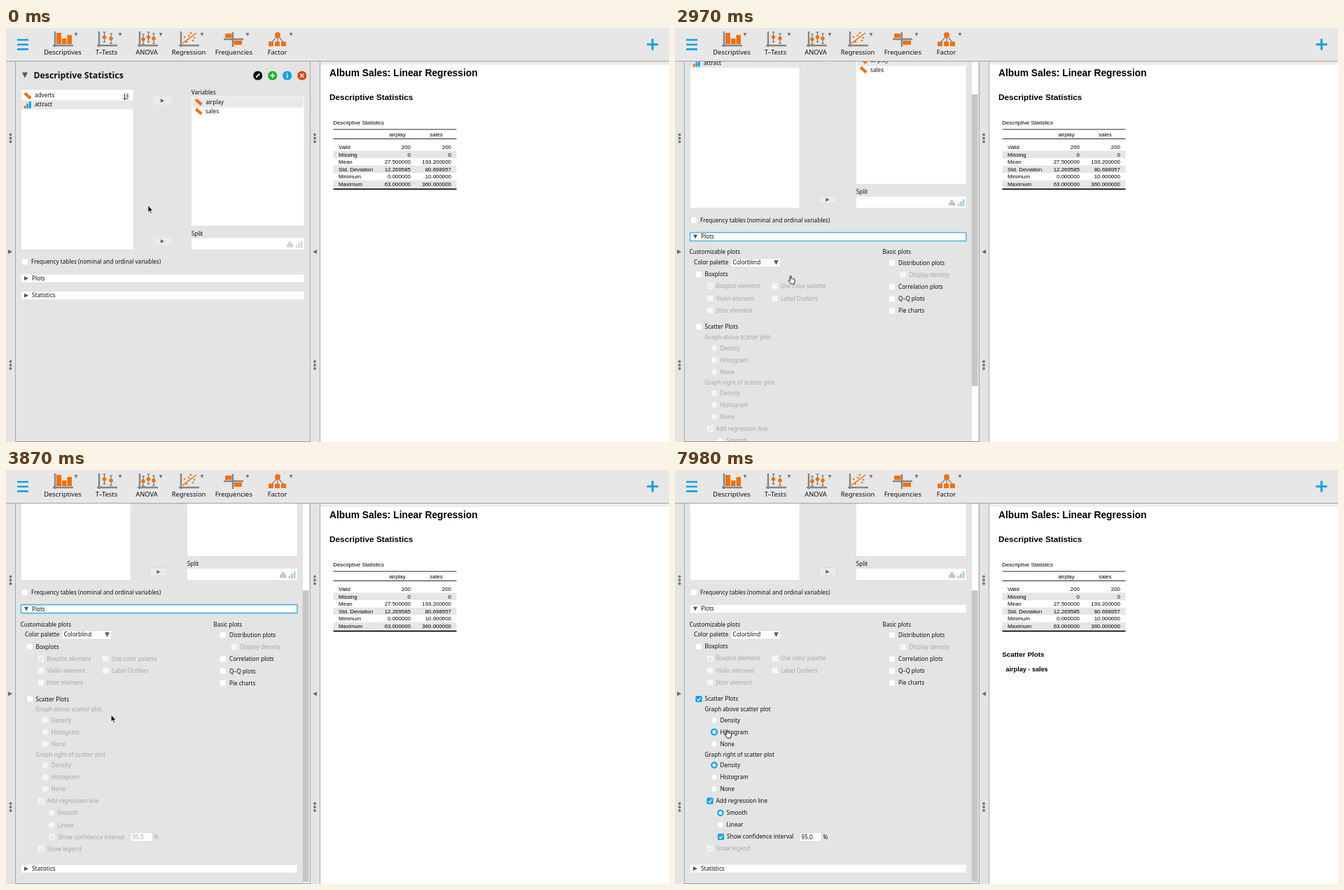
These frames come from a looping animation (947 px wide and 592 px high, 8 s). An HTML page:

```html
<!DOCTYPE html>
<html lang="en">
<head>
<meta charset="utf-8">
<title>Descriptive Statistics</title>
<style>
html, body { margin: 0; width: 100%; height: 100%; overflow: hidden; background: #fff; }
svg { display: block; width: 100vw; height: 100vh; }
text { font: 8.15px "Noto Sans", "Open Sans", sans-serif; fill: #111; white-space: pre; }
.off { fill: #a6a6a6; }
.tool { font-size: 9.4px; text-anchor: middle; }
.head { font-size: 12.25px; font-weight: 700; }
.doc text { font: 7.9px "Liberation Sans", Arial, sans-serif; fill: #000; }
.doc .h1 { font-size: 13.8px; font-weight: 700; }
.doc .h2 { font-size: 11.8px; font-weight: 700; }
.doc .h3 { font-size: 9.9px; font-weight: 700; }
.doc .h4 { font-size: 9.1px; font-weight: 700; }
.doc .axis { font-size: 11px; }
.doc .name { font-size: 11.5px; }
.mid { text-anchor: middle; }
.end { text-anchor: end; }
</style>
</head>
<body>
<svg viewBox="0 0 947 592" preserveAspectRatio="none">
  <clipPath id="view"><rect x="14" y="48" width="420" height="543"/></clipPath>
  <clipPath id="fold"><rect id="foldBox" x="14" y="366" width="410" height="0"/></clipPath>
  <g id="frame"></g>
  <g clip-path="url(#view)"><g id="panel"></g><g id="bar"></g></g>
  <g id="doc" class="doc"></g>
  <g id="plot" class="doc"></g>
  <g id="spin" fill="none" stroke-width="1.4">
    <circle r="4.3" stroke="#ddd"/><path d="M0-4.3A4.3 4.3 0 1 1-4.3 0" stroke="#555"/>
  </g>
  <path id="pointer"/>
</svg>
<script>
const BLUE = '#14a1e3', ORANGE = '#f2700d', GREY = '#858585';
const $ = id => document.getElementById(id);

const text = (x, y, s, cls = '') => `<text x="${x}" y="${y}" class="${cls}">${s}</text>`;
const rect = (x, y, w, h, fill, more = '') =>
  `<rect x="${x}" y="${y}" width="${w}" height="${h}" fill="${fill}" ${more}/>`;
const dot = (x, y, r, fill, more = '') => `<circle cx="${x}" cy="${y}" r="${r}" fill="${fill}" ${more}/>`;
const line = (d, stroke, w = 1) => `<path d="${d}" fill="none" stroke="${stroke}" stroke-width="${w}"/>`;
const shape = (d, fill, more = '') => `<path d="${d}" fill="${fill}" ${more}/>`;
const right = (x, y, r, fill = '#555') => shape(`M${x - r} ${y - r}L${x + r} ${y}L${x - r} ${y + r}Z`, fill);
const down = (x, y, r, fill = '#555') => shape(`M${x - r} ${y - r}H${x + r}L${x} ${y + r}Z`, fill);

// Smooth curve through points, without the leading command
function curve(p) {
  let d = p[0].join();
  for (let i = 0; i < p.length - 1; i++) {
    const a = p[i - 1] || p[i], b = p[i], c = p[i + 1], e = p[i + 2] || c;
    d += `C${b[0] + (c[0] - a[0]) / 6},${b[1] + (c[1] - a[1]) / 6} ` +
         `${c[0] - (e[0] - b[0]) / 6},${c[1] - (e[1] - b[1]) / 6} ${c}`;
  }
  return d;
}

function frameMarkup() {
  let m = rect(0, 0, 947, 592, '#e4e4e4') + rect(449, 49, 498, 543, '#fff') +
    rect(449, 48, 498, 4.5, '#ececec') + rect(0, 0, 947, 47, '#e7e7e7') +
    line('M0 47.5H947', '#a2a2a2') +
    line('M13.5 48V592M434.5 48V592M448.5 48V592', '#a8a8a8') + line('M14 591.5H434', '#999') +
    line('M16 17H32M16 23.7H32M16 30.4H32', BLUE, 2.6) + line('M915.5 23.5H931.5M923.5 15.5V31.5', BLUE, 3.2);
  for (const x of [6.5, 441])
    for (const y of [152.5, 157.5, 162.5, 477, 482, 487]) m += dot(x, y, 2, '#7a7a7a');
  m += right(6, 320, 3, '#666') + shape('M444 317L438.5 320L444 323Z', '#666');

  const axes = x => line(`M${x + 2} 5V27M${x - 1} 25H${x + 28}`, GREY, 2.4);
  const stem = (x, y) => line(`M${x} ${y - 7}V${y + 7}M${x - 2} ${y - 7}h4M${x - 2} ${y + 7}h4`, '#666') + dot(x, y, 2.8, ORANGE);
  m += axes(68) + rect(72, 7, 7, 16, ORANGE) + rect(80, 15, 6.5, 8, ORANGE) + rect(87.5, 10, 6.5, 13, ORANGE);
  m += axes(131) + stem(140.5, 13) + stem(150, 15);
  m += axes(189) + stem(196, 16) + stem(203.5, 13) + stem(211, 15);
  m += axes(248) + line('M252 22L272 7', ORANGE, 1.5);
  for (const [x, y] of [[255, 13], [261, 11], [267, 18], [264, 7], [269, 14], [258, 20]]) m += dot(x, y, 1.3, ORANGE);
  m += line('M324 6V27M311 16H339', GREY, 2.4) + rect(313, 8, 9.5, 6, ORANGE) + rect(325.5, 18, 11.5, 6, ORANGE);
  m += line('M388 10V21M388 11L379 21M388 11L397 21', GREY, 1.4) + dot(388, 10, 4, ORANGE);
  for (const x of [375, 384, 393]) m += rect(x, 19.5, 7, 6.5, ORANGE);
  [['Descriptives', 81, 100], ['T–Tests', 143.5, 163], ['ANOVA', 201, 221], ['Regression', 261, 280],
   ['Frequencies', 325.3, 345], ['Factor', 387.5, 407]].forEach(([s, x, a]) =>
    m += text(x, 38.3, s, 'tool') + down(a, 9.5, 2.4, '#777'));
  return m;
}

const ruler = (x, y) => rect(-5.5, -2.1, 11, 4.2, ORANGE, `transform="translate(${x} ${y}) rotate(42)"`);
const bars = (x, y, a = ORANGE, b = BLUE) =>
  rect(x - 5, y + 1, 2.6, 4, a) + rect(x - 1.6, y - 2, 2.8, 7, b) + rect(x + 2, y - 5, 2.8, 10, b);

// kind: c = checkbox, r = radio; mode: 0 disabled, 1 enabled, 2 selected
function option(kind, x, y, tx, label, mode, { tick, focus } = {}) {
  const fill = mode ? '#fff' : '#f6f6f6', edge = `stroke="${mode ? '#d6d6d6' : '#e4e4e4'}" stroke-width=".6"`;
  const check = c => line(`M${x - 2.3} ${y + .2}l1.7 2 3-4.2`, c, 1.2);
  let m = '';
  if (kind === 'c') {
    if (focus) m += rect(x - 5.8, y - 5.8, 11.6, 11.6, '#8fd0f0', 'rx="2"');
    m += rect(x - 4.6, y - 4.6, 9.2, 9.2, mode === 2 ? BLUE : fill, 'rx="1.6" ' + (mode === 2 ? '' : edge));
    if (mode === 2) m += check('#fff');
    else if (tick) m += check('#d8d8d8');
  } else {
    if (focus) m += dot(x, y, 5.6, '#8fd0f0');
    m += mode === 2 ? dot(x, y, 3.7, '#fff', `stroke="${BLUE}" stroke-width="2.2"`) : dot(x, y, 4.5, fill, edge);
  }
  return m + text(tx, y + 2.9, label, mode ? '' : 'off');
}

function section(y, label, open, focus, w) {
  return rect(21.5, y - 6, w, 12, '#fff', focus ? 'stroke="#4fb3e8" stroke-width="1.6" rx="1"' : 'stroke="#d8d8d8" stroke-width=".5" rx="1"') +
    (open ? down : right)(29, y, 3) + text(37, y + 2.9, label);
}

function plotOptions(on, hist) {
  const live = on ? 1 : 0, pick = on ? 2 : 0, cls = on ? '' : 'off';
  return text(20.5, 383, 'Customizable plots') + text(296.5, 383, 'Basic plots') +
    text(27, 397.7, 'Color palette') + rect(80, 389, 70.5, 12.4, '#fff', 'rx="1" stroke="#d0d0d0" stroke-width=".6"') +
    text(82.5, 397.7, 'Colorblind') + down(144.5, 395, 3.3) +
    option('c', 34, 412, 42.5, 'Boxplots', 1) +
    option('c', 50, 429, 58.5, 'Boxplot element', 0, { tick: 1 }) +
    option('c', 142.5, 429, 151, 'Use color palette', 0) +
    option('c', 50, 446.3, 58.5, 'Violin element', 0) +
    option('c', 142.5, 446.3, 151, 'Label Outliers', 0) +
    option('c', 50, 463.4, 58.5, 'Jitter element', 0) +
    option('c', 310, 395.5, 319, 'Distribution plots', 1) +
    option('c', 326, 412.5, 334.5, 'Display density', 0) +
    option('c', 310, 429.8, 319, 'Correlation plots', 1) +
    option('c', 310, 447, 319, 'Q–Q plots', 1) +
    option('c', 310, 464, 319, 'Pie charts', 1) +
    option('c', 34, 487, 42.5, 'Scatter Plots', on ? 2 : 1, { focus: on && !hist }) +
    text(42.5, 504.8, 'Graph above scatter plot', cls) +
    option('r', 56, 517.2, 64.5, 'Density', hist ? 1 : pick) +
    option('r', 56, 534.2, 64.5, 'Histogram', hist ? 2 : live, { focus: hist }) +
    option('r', 56, 551.2, 64.5, 'None', live) +
    text(42.5, 569.2, 'Graph right of scatter plot', cls) +
    option('r', 56, 581.5, 64.5, 'Density', pick) +
    option('r', 56, 598.5, 64.5, 'Histogram', live) +
    option('r', 56, 615.5, 64.5, 'None', live) +
    option('c', 50, 632.7, 58.5, 'Add regression line', pick, { tick: 1 }) +
    option('r', 65, 649.8, 73.5, 'Smooth', pick) +
    option('r', 65, 667, 73.5, 'Linear', live) +
    option('c', 65.5, 684, 74, 'Show confidence interval', pick, { tick: 1 }) +
    rect(178, 677.8, 31, 12.6, '#fff', 'stroke="#d0d0d0" stroke-width=".6"') +
    text(180.5, 687, '95.0', cls) + text(211.5, 687, '%', cls) +
    option('c', 50, 701, 58.5, 'Show legend', 0, { tick: 1 });
}

function panelMarkup(fold, on, hist) {
  const narrow = fold > .5, L = narrow ? 178 : 182, R = narrow ? 258.7 : 264.7, E = narrow ? 416 : 426;
  const mid = narrow ? 218 : 223.5, top = E - 3.3;
  const box = (x, y, w, h) => rect(x, y, w, h, '#fff', 'stroke="#d8d8d8" stroke-width=".5"');
  const arrow = y => rect(mid - 13, y - 6, 26, 12, '#ebebeb', `rx="1.5" stroke="${narrow ? '#d2d2d2' : '#e6e6e6'}" stroke-width=".7"`) +
    right(mid, y, 2.7, '#666');
  let m = down(27, 67.5, 4) + text(39.5, 72.2, 'Descriptive Statistics', 'head');
  ['#111', '#12b526', BLUE, '#d8480f'].forEach((c, i) => m += dot(top - 63 + i * 21, 68, 6.6, c));
  m += line(`M${top - 65.5} 70.5l5-5`, '#fff', 1.8) + line(`M${top - 45.5} 68h7M${top - 42} 64.5v7`, '#fff', 1.7) +
    line(`M${top - 21} 67v4.5M${top - 21} 64.2v1.6`, '#fff', 1.6) + line(`M${top - 2.5} 65.5l5 5m0-5l-5 5`, '#fff', 1.5);
  m += box(21.5, 88, L - 21.5, 229) + rect(22, 103.3, L - 22, 13, '#e6e6e6') +
    ruler(31, 97) + text(41, 99.3, 'adverts') + bars(31, 110) + text(41, 112.3, 'attract') +
    dot(L - 10.5, 98.5, 6.5, '#f0f0f0') + line(`M${L - 12.5} 94v8.5m-1.8-2l1.8 2 1.8-2`, '#222', .9) +
    `<g transform="translate(${L - 10.2} 97.8) scale(.62)">${text(0, 0, 'A')}${text(0, 7.5, 'Z')}</g>`;
  m += arrow(104) + arrow(305);
  m += text(R, 95, 'Variables') + box(R, 98, E - R, 185) + rect(R + 2, 99.8, E - R - 4, 13.4, '#e9e9e9', 'rx="1.5" stroke="#d4d4d4" stroke-width=".5"') +
    ruler(R + 10.5, 106) + text(R + 20.5, 109, 'airplay') + ruler(R + 10.5, 119.3) + text(R + 20.3, 122.2, 'sales');
  m += text(R, 296.5, 'Split') + box(R, 300, E - R, 17.2);
  const hues = narrow ? ['#efc4a8', '#a9cfe2', '#b9c9b4'] : ['#d6d6d6', '#d6d6d6', '#cecece'];
  m += dot(E - 20.5, 307.5, 2.6, hues[0]) + dot(E - 22.6, 311.3, 2.6, hues[1]) + dot(E - 18.2, 311.3, 2.6, hues[2]) +
    bars(E - 7.3, 309.5, hues[0], hues[1]);
  m += option('c', 27, 334.5, 36, 'Frequency tables (nominal and ordinal variables)', 1);
  m += section(358, 'Plots', fold > 0, fold > 0 && !on, E - 21.5);
  if (fold > 0) m += `<g clip-path="url(#fold)">${plotOptions(on, hist)}</g>`;
  return m + section(382.5 + 347 * fold, 'Statistics', false, false, E - 21.5);
}

function tableMarkup() {
  let m = text(462, 69, 'Album Sales: Linear Regression', 'h1') + text(462, 102.7, 'Descriptive Statistics', 'h2') +
    text(467.2, 138, 'Descriptive Statistics') + line('M467.5 145H643.5M467.5 158.5H643.5', '#111', .9) +
    text(559, 154.5, 'airplay', 'mid') + text(614.5, 154.5, 'sales', 'mid');
  [['Valid', '200', '200'], ['Missing', '0', '0'], ['Mean', '27.500000', '193.200000'],
   ['Std. Deviation', '12.269585', '80.698957'], ['Minimum', '0.000000', '10.000000'],
   ['Maximum', '63.000000', '360.000000']].forEach(([a, b, c], i) => {
    const y = 173 + i * 10.55;
    if (i % 2) m += rect(467.5, y - 8, 176, 10.6, '#e6e6e6');
    m += text(475, y, a) + text(578, y, b, 'end') + text(636, y, c, 'end');
  });
  return m + line('M467.5 230.3H643.5', '#000', 1.8);
}

const plotHead = text(467.2, 267, 'Scatter Plots', 'h3') + text(472.5, 288, 'airplay - sales', 'h4');

function plotMarkup() {
  const px = v => 528 + v * 1.745, py = v => 455 - v * .315;
  const density = (p, close) => shape('M' + curve(p) + close, '#999', 'stroke="#222" stroke-width=".8"');
  let m = density([[528, 317.5], [541, 313.5], [553, 309], [562, 302.5], [570, 299.5], [579, 299.3], [588, 299.5], [597, 304.5], [607, 308.5], [621, 312.5], [636, 317.5], [650, 320]], 'V320.5H528Z') +
    density([[658, 329], [663, 342], [668, 352], [673, 364], [678, 377], [679.7, 387], [677, 397], [675.5, 407], [674.5, 415], [671, 426], [664, 440], [658, 455]], 'H657.6V329Z');
  let seed = 11;
  const rnd = () => (seed = seed * 16807 % 2147483647) / 2147483647;
  const gauss = () => Math.sqrt(-2 * Math.log(rnd())) * Math.cos(6.2832 * rnd());
  const points = [[5, 250], [63, 310], [53, 360], [4, 10], [53, 120], [39, 90], [0, 120], [1, 70], [2, 140], [9, 30], [57, 230], [55, 250]];
  while (points.length < 200) {
    const x = Math.round(27.5 + 12 * gauss());
    const y = 10 * Math.round((110 + 155 / (1 + Math.exp(-(x - 28) / 6.2)) + 66 * gauss()) / 10);
    if (x >= 0 && x < 54 && y >= 40 && y <= 360) points.push([x, y]);
  }
  for (const [x, y] of points) m += dot(px(x), py(y), 2.4, '#aaa', 'stroke="#222" stroke-width=".8"');
  const upper = [[528, 409], [542, 414], [556, 408], [572, 393], [592, 372], [606, 366], [620, 362], [638, 348]];
  const lower = [[638, 399], [620, 381], [606, 377], [592, 381], [572, 401], [556, 417], [542, 424], [528, 430]];
  m += shape(`M${curve(upper)}L${curve(lower)}Z`, '#999', 'opacity=".42"');
  m += line('M' + curve([[528, 420], [540, 419], [552, 415], [563, 407.5], [572, 397], [582, 385], [592, 377.5], [605, 372], [617, 370.8], [627, 372], [638, 374]]), '#2f62d9', 1.6);
  m += line('M521.5 329V455', '#222', .9) + line(`M528 461H${px(60)}`, '#222', .9);
  for (let v = 0; v <= 400; v += 100) m += line(`M517 ${py(v)}h4.5`, '#222', .9) + text(511.5, py(v) + 4, v, 'axis end');
  for (let v = 0; v <= 60; v += 20) m += line(`M${px(v)} 461v4.5`, '#222', .9) + text(px(v), 479.8, v, 'axis mid');
  return m + text(589, 499.5, 'airplay', 'name mid') +
    `<g transform="translate(484.5 392) rotate(-90)">${text(0, 0, 'sales', 'name mid')}</g>`;
}

const ARROW = 'M0 0V9.5L2.2 7.4 3.8 11 5.2 10.4 3.6 7H6.5Z';
const HAND = 'M-.8.8C-.8-.4.9-.4.9.8V4.2C1.5 3.4 2.6 3.7 2.7 4.4 3.4 3.8 4.4 4 4.5 4.9 5.3 4.5 6.2 4.9 6.2 5.9V8.3L5.2 11.5H.6L-2.8 7.2C-3.2 6-1.8 5.6-.8 7Z';
const MOVES = [[1270, 1900, 165, 354.5], [3700, 4350, 79, 330.3], [6200, 6700, 74.2, 371.8]];
const ease = (t, a, b) => {
  const k = Math.min(1, Math.max(0, (t - a) / (b - a)));
  return k * k * (3 - 2 * k);
};

const cache = {};
function put(id, markup) {
  if (cache[id] !== markup) $(id).innerHTML = cache[id] = markup;
}

put('frame', frameMarkup());
put('doc', tableMarkup());
const fullPlot = plotHead + plotMarkup();

function draw(t) {
  const fold = ease(t, 2150, 2400);
  const scroll = t < 2907 ? 0 : 159.5 * (1 - Math.exp((2907 - t) / 137));
  const on = t >= 4450, hist = t >= 7300;
  put('panel', panelMarkup(fold, on, hist));
  $('panel').setAttribute('transform', `translate(0 ${-scroll})`);
  $('foldBox').setAttribute('height', 350 * fold);
  put('bar', fold > .5 ? rect(423.5, 48, 10, 543, '#fff', 'stroke="#ccc" stroke-width=".5"') +
    rect(424, 49 + scroll * .773, 8.5, 417, '#c6c6c6') : '');

  put('plot', t < 5500 ? '' : t >= 5650 && t < 7900 ? fullPlot : plotHead);
  const busy = t >= 4550 && t < 5650 || t >= 7400 && t < 7900;
  $('spin').setAttribute('visibility', busy ? 'visible' : 'hidden');
  $('spin').setAttribute('transform', `translate(603.5 99) rotate(${(t - 4920) * .36})`);

  let x = 203, y = 254;
  for (const [a, b, tx, ty] of MOVES) {
    const k = ease(t, a, b);
    x += (tx - x) * k;
    y += (ty - y) * k;
  }
  const hand = t >= 1820 && !(t > 3780 && t < 4230), p = $('pointer');
  p.setAttribute('d', hand ? HAND : ARROW);
  p.setAttribute('fill', hand ? '#fff' : '#000');
  p.setAttribute('stroke', hand ? '#000' : '#fff');
  p.setAttribute('stroke-width', hand ? .9 : .6);
  p.setAttribute('transform', `translate(${x} ${y})`);
}

const start = performance.now();
function tick() {
  draw((performance.now() - start) % 8000);
  requestAnimationFrame(tick);
}
tick();
</script>
</body>
</html>
```
